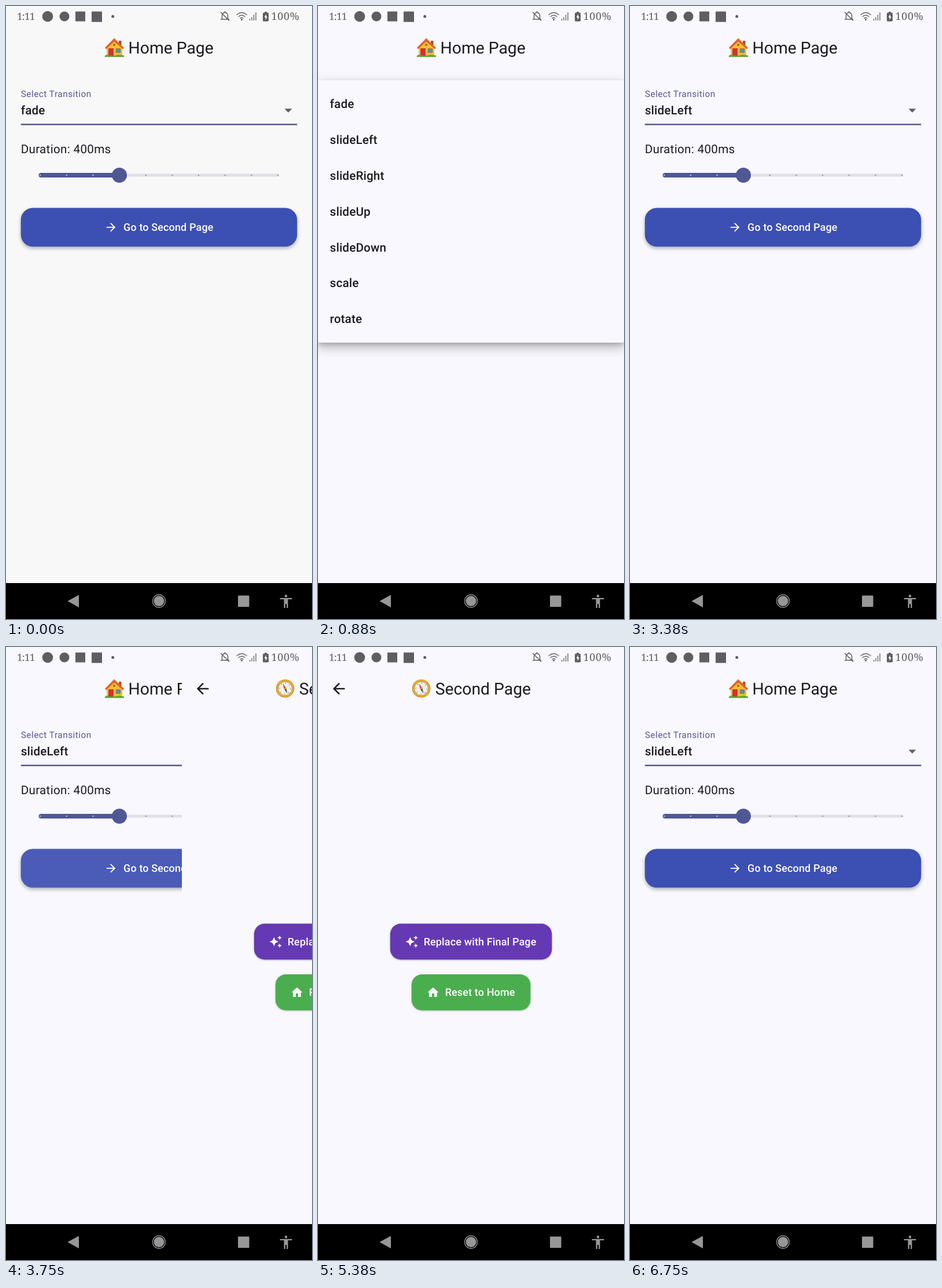
Animation of 529 by 1058 pixels, one loop 8000 ms. Source, as an HTML page:

```html
<!DOCTYPE html>
<html lang="en">
<head>
<meta charset="utf-8">
<title>Page transitions</title>
<style>
  html, body { margin: 0; width: 100%; height: 100%; overflow: hidden; background: #f8f8fe; }
  svg { display: block; width: 100vw; height: 100vh; --bg: #f8f8fe; --focus: 1; }
  text { font-family: Roboto, sans-serif; fill: #1a1a20; white-space: pre; text-rendering: geometricPrecision; }
  .bg { fill: var(--bg); }
  .title { font-size: 28.3px; }
  .body { font-size: 20.6px; letter-spacing: .32px; }
  .item { font-size: 20.6px; font-weight: 500; letter-spacing: .19px; }
  .label { font-size: 15.4px; letter-spacing: .48px; }
  .btn { font-size: 18px; font-weight: 500; letter-spacing: .13px; }
  .btn, .white { fill: #fff; }
  .status text { font-family: "Noto Serif", serif; fill: #5e5e62; }
  .label, .line { fill: color-mix(in srgb, #565890 calc(var(--focus) * 100%), #5c596d); }
  .raised { filter: drop-shadow(0 1.500px 1.600px rgba(0,0,0,.28)); }
  .high { filter: drop-shadow(0 3px 3px rgba(0,0,0,.3)); }
  #sheet {
    filter: drop-shadow(0 3px 4px rgba(0,0,0,.2)) drop-shadow(0 11px 8px rgba(0,0,0,.13))
            drop-shadow(0 4px 11px rgba(0,0,0,.11));
  }
</style>
</head>
<body>
<svg viewBox="0 0 529 1058" preserveAspectRatio="none">
  <g id="home">
    <rect class="bg" width="529" height="1058"/>
    <g id="house">
      <path d="M195 60h4.500v9H195z" fill="#a5502f"/>
      <path d="M174 71l13-12 14 12v15h-27z" fill="#f9c22e"/>
      <path d="M171 72l16-16.500L204 72l-2 2.500-15-13-14 13z" fill="#e5632d"/>
      <path d="M177 73h9v13h-9z" fill="#d52f35"/>
      <path d="M190 73.500h8v7h-8z" fill="#3f94c9" stroke="#c9752c"/>
      <circle cx="187" cy="67" r="2" fill="#a5602c"/>
      <path d="M171 88v-2.500q4-3 8 0h8q8-3 17 0V88z" fill="#5fa83c"/>
    </g>
    <text class="title" x="211.600" y="81.500">Home Page</text>
    <text class="label" x="25.7" y="156.500">Select Transition</text>
    <text class="item" id="choice" x="25.7" y="187"></text>
    <path d="M481.500 177.300h13l-6.500 6.700z" fill="#626266"/>
    <rect class="line" x="25.7" y="203.200" width="477.600" height="2.500"/>
    <text class="body" x="25.7" y="253.700">Duration: 400ms</text>
    <g id="slider">
      <rect x="190" y="289.500" width="282.500" height="5" rx="2.500" fill="#e0e0e5"/>
      <rect x="56.500" y="288" width="140" height="8" rx="4" fill="#4f5894"/>
    </g>
    <rect class="high" x="25.700" y="348.400" width="477.600" height="66.900" rx="20.600" fill="#3c4fb3"/>
    <rect class="white" id="press" x="25.700" y="348.400" width="477.600" height="66.900" rx="20.600" opacity="0"/>
    <path class="white" transform="translate(169.900 370.300) scale(.965)"
      d="M12 4l-1.410 1.410L16.170 11H4v2h12.170l-5.580 5.590L12 20l8-8z"/>
    <text class="btn" x="203" y="388.100">Go to Second Page</text>
  </g>

  <g id="menu">
    <rect id="sheet" class="bg" width="529" rx="2.500"/>
  </g>

  <g id="second">
    <rect class="bg" width="529" height="1058"/>
    <circle id="halo" cx="36" cy="72" r="25.700" fill="#e5e5ea"/>
    <path transform="translate(20.600 56.500) scale(1.287)" fill="#1a1a20"
      d="M20 11H7.830l5.590-5.590L12 4l-8 8 8 8 1.410-1.410L7.830 13H20z"/>
    <circle cx="178.500" cy="71.700" r="15.800" fill="#d99a1c"/>
    <circle cx="178.500" cy="71.700" r="14" fill="#f0b63a"/>
    <circle cx="178.500" cy="71.700" r="12" fill="#f2efe6" stroke="#a08a58"/>
    <circle cx="178.500" cy="71.700" r="9.500" fill="none" stroke="#77736a" stroke-width="2" stroke-dasharray="1 6.460"/>
    <path d="M174.500 63l5.800 8-3.600 1.600z" fill="#d8402f"/>
    <path d="M182.500 80.400l-5.800-7.800 3.600-1.600z" fill="#454a50"/>
    <circle cx="178.500" cy="71.700" r="1.400" fill="#e0a52a"/>
    <text class="title" x="202.700" y="81.500">Second Page</text>
    <rect class="raised" x="124.800" y="477.600" width="279.500" height="61.800" rx="18" fill="#6539b4"/>
    <path class="white" transform="translate(150.600 497) scale(.965)"
      d="M19 9l1.250-2.750L23 5l-2.750-1.250L19 1l-1.250 2.750L15 5l2.750 1.250zM11.500 9.500L9 4 6.500 9.500 1 12l5.500 2.500L9 20l2.500-5.500L17 12zM19 15l-1.250 2.750L15 19l2.750 1.250L19 23l1.250-2.750L23 19l-2.750-1.250z"/>
    <text class="btn" x="182.700" y="515">Replace with Final Page</text>
    <rect class="raised" x="161.800" y="565.100" width="205.500" height="61.800" rx="18" fill="#4aae4e"/>
    <path class="white" transform="translate(187.400 584.600) scale(.965)" d="M10 20v-6h4v6h5v-8h3L12 3 2 12h3v8z"/>
    <text class="btn" x="219.700" y="602.400">Reset to Home</text>
  </g>

  <g class="status" fill="#5e5e62">
    <text x="19" y="24" font-size="17" letter-spacing="-.7">1:11</text>
    <circle cx="72" cy="18" r="9.300"/>
    <circle cx="101" cy="18" r="8.500"/>
    <rect x="120" y="9.500" width="17" height="17"/>
    <rect x="148" y="9.500" width="18" height="18"/>
    <circle cx="184.700" cy="18" r="2.500"/>
    <g fill="none" stroke="#5e5e62" stroke-width="1.500">
      <path d="M371 23h15M373.500 23v-6q0-5 5-6 5 1 5 6v6M378.500 11V9M371 10.500l15 15"/>
      <path d="M398.500 15.500q9-8 18 0M401.500 18.500q6-5 12 0M404.500 21.300q3-2.300 6 0"/>
      <path d="M421.500 25v-3M425 25v-6M428.500 25V15M432 25V11" stroke-width="1.300"/>
    </g>
    <circle cx="407.500" cy="23.500" r="1.500"/>
    <path d="M447 10h4v1.500h1.500q1.500 0 1.500 1.500v12q0 1.500-1.500 1.500h-7q-1.500 0-1.500-1.500V13q0-1.500 1.500-1.500h1.500z"/>
    <path class="white" d="M449.800 14l-3.300 5.500h2.200V24l3.300-5.700h-2.200z"/>
    <text x="458.500" y="24.300" font-size="18" letter-spacing=".7">100%</text>
  </g>

  <rect y="996" width="529" height="62"/>
  <g fill="#979797">
    <path d="M106.500 1027L126 1016.500v21.500z"/>
    <circle cx="264.500" cy="1027" r="9"/>
    <circle cx="264.500" cy="1027" r="11" fill="none" stroke="#979797" stroke-width="1.300"/>
    <rect x="401" y="1017.500" width="19.500" height="19.500" rx="1"/>
    <path transform="translate(470.200 1013.700) scale(1.150)"
      d="M12 2a2 2 0 1 1 0 4 2 2 0 1 1 0-4zM21 9h-6v13h-2v-6h-2v6H9V9H3V7h18z"/>
  </g>
</svg>
<script>
const LOOP = 8000, TICK = 125, WIDTH = 529;
const MENU = { top: 128, pad: 10.3, row: 61.76, open: 470, close: 1933, time: 300 };
const SLIDE = { enter: 3570, leave: 5727, time: 400 };
const NAMES = ['fade', 'slideLeft', 'slideRight', 'slideUp', 'slideDown', 'scale', 'rotate'];

const $ = id => document.getElementById(id);
const svg = document.querySelector('svg');
const clamp = x => Math.min(1, Math.max(0, x));
const span = (x, from, to) => clamp((x - from) / (to - from));
const mix = (a, b, p) => a + (b - a) * p;
const ease = x => x * x * (3 - 2 * x);

function add(parent, tag, attrs) {
  const node = document.createElementNS(svg.namespaceURI, tag);
  for (const key in attrs) node.setAttribute(key, attrs[key]);
  return parent.appendChild(node);
}

for (let i = 0; i < 10; i++) {
  add($('slider'), 'circle', { cx: 59.2 + 45.65 * i, cy: 292, r: 1.3, fill: i < 3 ? '#b4b8d8' : '#9a9bac' });
}
add($('slider'), 'circle', { cx: 196, cy: 292, r: 13, fill: '#4f5894' });

const items = NAMES.map((name, i) => {
  const y = MENU.top + MENU.pad + MENU.row * (i + .5) + 7.3;
  const node = add($('menu'), 'text', { class: 'item', x: 20.6, y });
  node.textContent = name;
  return node;
});

// The sheet fades in, grows from the first row, then the rows appear in turn.
function drawMenu(t) {
  const closing = t >= MENU.close;
  const v = closing ? 1 - span(t, MENU.close, MENU.close + MENU.time)
                    : span(t, MENU.open, MENU.open + MENU.time);
  const grow = closing ? 1 : span(v, .25, .5);
  const height = mix(MENU.row, MENU.row * NAMES.length + 2 * MENU.pad, grow);
  const unit = .5 / (NAMES.length + 1.5);
  $('menu').setAttribute('opacity', closing ? span(v, .75, 1) : span(v, 0, .25));
  $('sheet').setAttribute('y', MENU.top + mix(MENU.pad, 0, grow));
  $('sheet').setAttribute('height', height);
  items.forEach((node, i) => {
    const start = .5 + (i + 1) * unit;
    node.setAttribute('opacity', i ? span(v, start, start + 1.5 * unit) : 1);
  });
}

function drawSecond(t) {
  const enter = ease(span(t, SLIDE.enter, SLIDE.enter + SLIDE.time));
  const leave = ease(span(t, SLIDE.leave, SLIDE.leave + SLIDE.time));
  const x = WIDTH * (1 - enter + leave);
  $('second').setAttribute('transform', `translate(${x} 0)`);
  $('second').setAttribute('visibility', x < WIDTH ? 'visible' : 'hidden');
  $('halo').setAttribute('opacity', span(t, 5750, 5875));
}

function draw(t) {
  svg.style.setProperty('--bg', t < 500 ? '#f8f8f8' : '#f8f8fe');
  svg.style.setProperty('--focus', t < 500 ? 1 : span(t, 2000, 2200));
  $('choice').textContent = t < MENU.close ? NAMES[0] : NAMES[1];
  $('press').setAttribute('opacity', t < 4000 ? .07 * span(t, 3375, 3625) : 0);
  drawMenu(t < 500 ? 0 : t);
  drawSecond(t);
}

// The screen refreshes eight times a second.
function loop() {
  const t = performance.now() % LOOP;
  draw(Math.floor(t / TICK) * TICK);
  requestAnimationFrame(loop);
}
loop();
</script>
</body>
</html>
```
